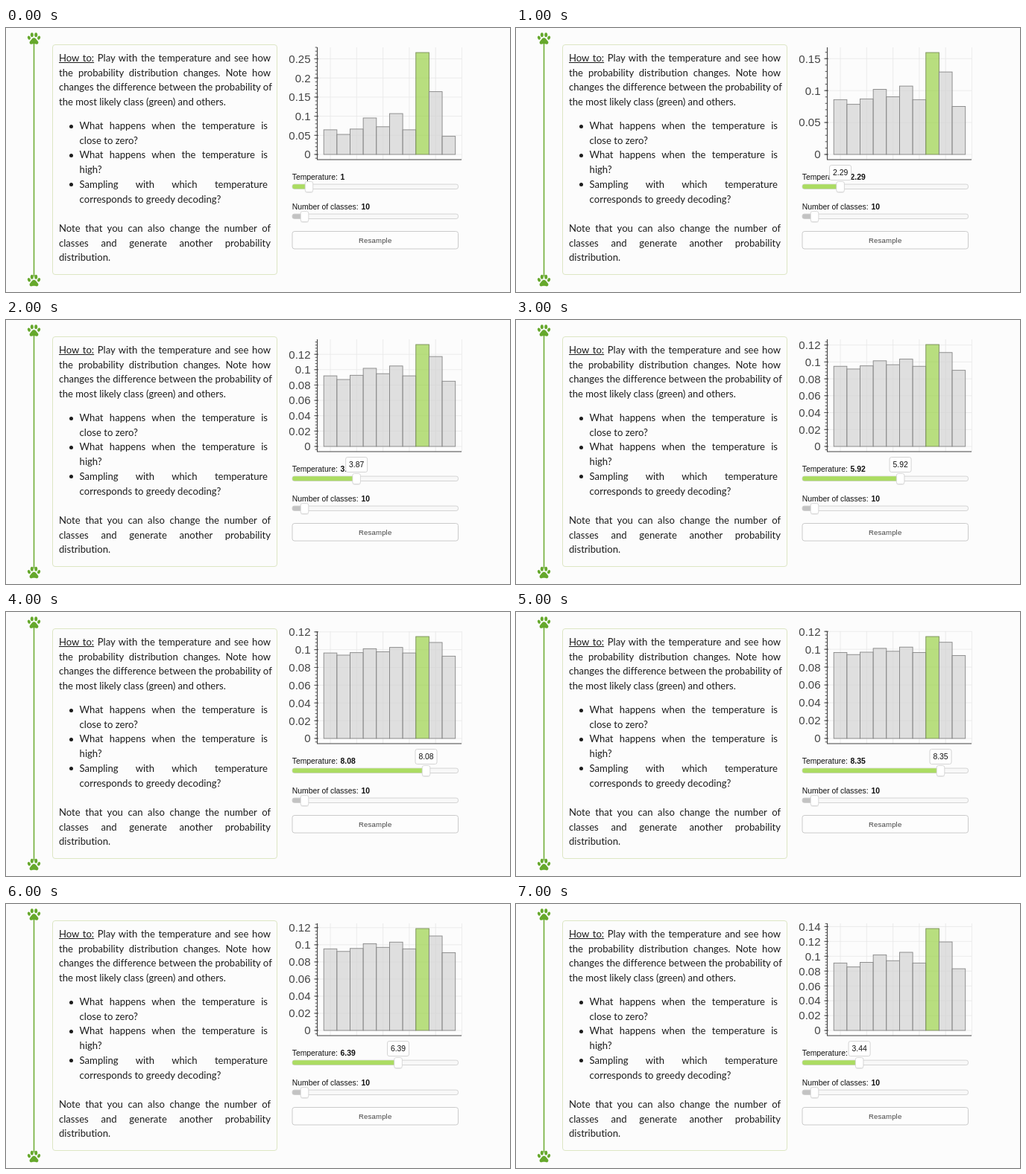
Recreate the animation shown at these times as an HTML page. Size 676x355 px, loop 8000 ms.

```html
<!DOCTYPE html>
<html lang="en">
<head>
<meta charset="utf-8">
<title>Softmax temperature</title>
<style>
  html, body { margin: 0; width: 100%; height: 100%; overflow: hidden; background: #fcfcfc; }
  #stage { position: relative; width: 676px; height: 355px; overflow: hidden; }
  svg { position: absolute; left: 0; top: 0; }
  svg text { font-family: "Liberation Sans", Arial, sans-serif; font-size: 10.4px; fill: #111; }
  svg text.tick { font-size: 15px; fill: #444; text-anchor: end; }
  svg .mid { text-anchor: middle; }
  .value { font-weight: bold; }
  .howto {
    position: absolute; left: 62px; top: 22px; width: 300px; height: 308px;
    border: 1px solid #dde6c4; border-radius: 4px; box-sizing: content-box;
    font: 13.1px/19.72px Lato, sans-serif; font-variant-ligatures: none; color: #1c1c1c;
  }
  .howto p, .howto ul { position: absolute; left: 8px; width: 284px; margin: 0; padding: 0; white-space: nowrap; }
  .howto ul { left: 35.6px; width: 252.4px; list-style: none; }
  .howto li { position: relative; }
  .howto li::before {
    content: ""; position: absolute; left: -14px; top: 7.5px;
    width: 5px; height: 5px; border-radius: 50%; background: #1c1c1c;
  }
  .fill { display: block; text-align: justify; text-align-last: justify; }
</style>
</head>
<body>
<div id="stage">
  <div class="howto">
    <p style="top:8px">
      <span class="fill"><u>How to:</u> Play with the temperature and see how</span>
      <span class="fill">the probability distribution changes. Note how</span>
      <span class="fill">changes the difference between the probability of</span>
      the most likely class (green) and others.
    </p>
    <ul style="top:99px">
      <li><span class="fill">What happens when the temperature is</span>close to zero?</li>
      <li><span class="fill">What happens when the temperature is</span>high?</li>
      <li><span class="fill">Sampling with which temperature</span>corresponds to greedy decoding?</li>
    </ul>
    <p style="top:237px">
      <span class="fill">Note that you can also change the number of</span>
      <span class="fill">classes and generate another probability</span>
      distribution.
    </p>
  </div>

  <svg width="676" height="355" viewBox="0 0 676 355">
    <defs>
      <g id="paw" fill="#66a82c">
        <ellipse cx="-6.6" cy="-.9" rx="1.9" ry="2.7" transform="rotate(-25 -6.6 -.9)"/>
        <ellipse cx="-2.7" cy="-4.8" rx="2" ry="3"/>
        <ellipse cx="2.7" cy="-4.8" rx="2" ry="3"/>
        <ellipse cx="6.6" cy="-.9" rx="1.9" ry="2.7" transform="rotate(25 6.6 -.9)"/>
        <path d="M0-.8C2.6-.8 3.3 1.8 5 3.4C7 5.4 5.5 8.2 3 7.7C1 7.2-1 7.2-3 7.7C-5.5 8.2-7 5.4-5 3.4C-3.3 1.8-2.6-.8 0-.8Z"/>
      </g>
      <g id="thumb">
        <rect x="-5.5" y="-6.6" width="11" height="15" rx="3" fill="#000" opacity=".07"/>
        <rect x="-5.3" y="-7" width="10.6" height="14" rx="2.5" fill="#fff" stroke="#d2d2d2" stroke-width=".8"/>
      </g>
      <rect id="track" x="384" y="-3.2" width="222.5" height="6.4" rx="2.6" stroke="#cbcbcb" stroke-width=".8"/>
    </defs>

    <path d="M37.5 20V334" stroke="#70ae38" stroke-width="1.6"/>
    <use href="#paw" x="37.5" y="14"/>
    <use href="#paw" x="37.5" y="339.5"/>

    <g id="plot"></g>

    <text x="383.7" y="204">Temperature: <tspan id="temp" class="value" dx=".7"></tspan></text>
    <use href="#track" y="213.3" fill="#f8f8f8"/>
    <rect id="level" x="384.2" y="210.3" height="6" rx="2.4" fill="#abdc62"/>
    <use id="knob" href="#thumb" y="213.5"/>

    <text x="383.7" y="244">Number of classes: <tspan class="value" dx=".9">10</tspan></text>
    <use href="#track" y="253.3" fill="#f8f8f8"/>
    <rect x="384.2" y="250.3" width="14" height="6" rx="2.4" fill="#c3c3c3"/>
    <use href="#thumb" x="400.5" y="253.5"/>

    <rect x="384" y="273.5" width="222.5" height="23.5" rx="3" fill="#fdfdfd" stroke="#cbcbcb"/>
    <text class="mid" x="495.2" y="289.3" style="font-size:9.6px;letter-spacing:.15px;fill:#444">Resample</text>

    <g id="tip">
      <rect x="-14.5" y="184.5" width="29" height="20" rx="2.5" fill="#fff" stroke="#d0d0d0" stroke-width=".9"/>
      <text class="mid" y="198.3">0</text>
    </g>
  </svg>
</div>

<script>
const probs = [.0645, .0525, .0665, .0955, .0725, .107, .0645, .267, .1645, .0475];
const temps = [1, 2.29, 3.87, 5.92, 8.08, 8.35, 6.39, 3.44];
const axis = { left: 417.5, right: 611, top: 26, zero: 170, bottom: 177 };
const bar = { left: 426.2, width: 17.65, max: 137 };
const $ = id => document.getElementById(id);

function softmax(t) {
  const powers = probs.map(p => p ** (1 / t));
  const sum = powers.reduce((a, b) => a + b);
  return powers.map(p => p / sum);
}

// Choose the step that gives a tick count nearest to six.
function tickStep(range) {
  const off = s => Math.abs(range / s - 6);
  return [.01, .02, .05, .1].reduce((a, b) => off(b) < off(a) ? b : a);
}

const line = (d, color, width) => `<path d="${d}" fill="none" stroke="${color}" stroke-width="${width}"/>`;

function plot(t) {
  const p = softmax(t), top = Math.max(...p), scale = bar.max / top;
  const { left, right, zero, bottom } = axis;
  const step = tickStep((bottom - axis.top) / scale), minor = step * scale / 5;
  let grid = "", major = "", small = "", labels = "", bars = "";

  for (let i = 0; i <= 10; i += 2)
    grid += `M${bar.left + bar.width * (i + .5)} ${axis.top}V${bottom}`;
  for (let k = Math.ceil((zero - bottom) / minor); zero - k * minor >= axis.top; k++) {
    const y = zero - k * minor;
    small += `M${left - 2.8} ${y}H${left}`;
    if (k % 5) continue;
    grid += `M${left} ${y}H${right}`;
    major += `M${left - 4.2} ${y}H${left + 1.4}`;
    labels += `<text class="tick" x="408.5" y="${y + 5.4}">${+(k / 5 * step).toFixed(2)}</text>`;
  }
  p.forEach((v, i) => {
    const h = v * scale, best = v === top;
    bars += `<rect x="${bar.left + i * bar.width}" y="${zero - h}" width="${bar.width}" height="${h}"
      fill="${best ? "#9cd24b" : "#d3d3d3"}" fill-opacity=".7"
      stroke="${best ? "#7c8f5c" : "#868686"}" stroke-width=".9"/>`;
  });
  return line(grid, "#e7e7e7", .8) + bars +
    line(`M${left} ${axis.top}V${bottom}H${right}`, "#444", 1.1) +
    line(major + small, "#444", .9) + labels;
}

function show(t) {
  const x = 384.3 + 22.18 * t;
  $("plot").innerHTML = plot(t);
  $("temp").textContent = t;
  $("level").setAttribute("width", x - 384.2);
  $("knob").setAttribute("x", x);
  $("tip").setAttribute("transform", `translate(${x} 0)`);
  $("tip").style.display = t === 1 ? "none" : "";
  $("tip").querySelector("text").textContent = t;
}

let current = -1;
function tick() {
  const i = Math.floor(performance.now() / 1000) % temps.length;
  if (i !== current) show(temps[current = i]);
  requestAnimationFrame(tick);
}
tick();
</script>
</body>
</html>
```
